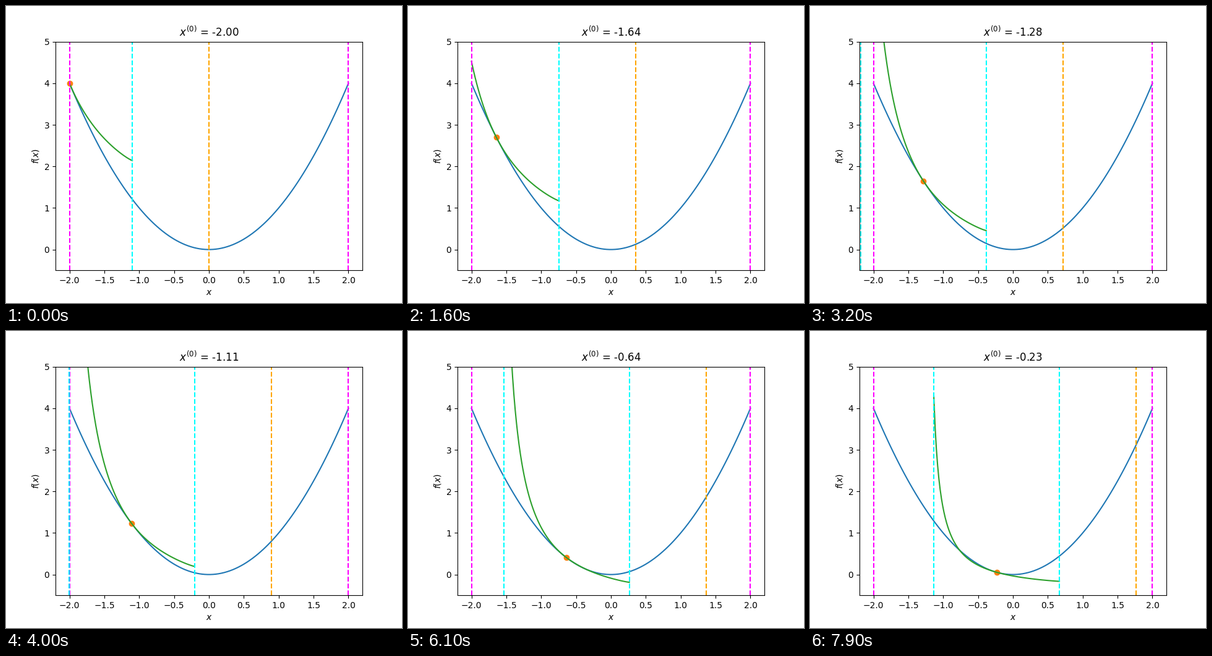
A matplotlib script for the animation above (8 s loop, 640 px wide and 480 px high).

```python
import matplotlib.pyplot as plt
import numpy as np
from matplotlib.animation import FuncAnimation

X_MIN, X_MAX = -2.0, 2.0
SPAN = X_MAX - X_MIN
FRAMES, INTERVAL = 80, 100
STEP = SPAN / 179          # the point sweeps the domain in 180 positions
ASYM = 0.25 * SPAN         # distance to the asymptotes
MOVE = 0.5 * SPAN          # move limit


def f(x):
    return x ** 2


def df(x):
    return 2 * x


def mma(x, x0):
    """Convex approximation of f around x0 with moving asymptotes."""
    low, upp = x0 - ASYM, x0 + ASYM
    pos, neg = max(df(x0), 0), max(-df(x0), 0)
    eps = 1e-5 / SPAN
    p = ASYM ** 2 * (1.001 * pos + 0.001 * neg + eps)
    q = ASYM ** 2 * (0.001 * pos + 1.001 * neg + eps)
    r = f(x0) - (p + q) / ASYM
    return r + p / (upp - x) + q / (x - low)


fig, ax = plt.subplots(figsize=(6.4, 4.8), dpi=100)
xs = np.linspace(X_MIN, X_MAX, 100)
ax.plot(xs, f(xs), color="C0")
dot, = ax.plot([], [], "o", color="C1")
approx, = ax.plot([], [], color="C2")


def vlines(color):
    return [ax.axvline(x, color=color, linestyle="--") for x in (X_MIN, X_MAX)]


bounds = vlines("magenta")
moves = vlines("orange")
limits = vlines("cyan")

ax.set_xlim(-2.2, 2.2)
ax.set_ylim(-0.5, 5)
ax.set_xlabel("$x$")
ax.set_ylabel("$f(x)$")


def place(pair, x0, d):
    for line, x in zip(pair, (x0 - d, x0 + d)):
        line.set_xdata([x, x])


def update(i):
    x0 = X_MIN + i * STEP
    reach = 0.9 * ASYM
    x = np.linspace(max(X_MIN, x0 - reach), min(X_MAX, x0 + reach), 100)
    approx.set_data(x, mma(x, x0))
    dot.set_data([x0], [f(x0)])
    place(moves, x0, MOVE)
    place(limits, x0, reach)
    ax.set_title(f"$x^{{(0)}}$ = {x0:.2f}")
    return dot, approx, *moves, *limits


anim = FuncAnimation(fig, update, frames=FRAMES, interval=INTERVAL,
                     repeat=True, repeat_delay=0, blit=False)
plt.show()
```
